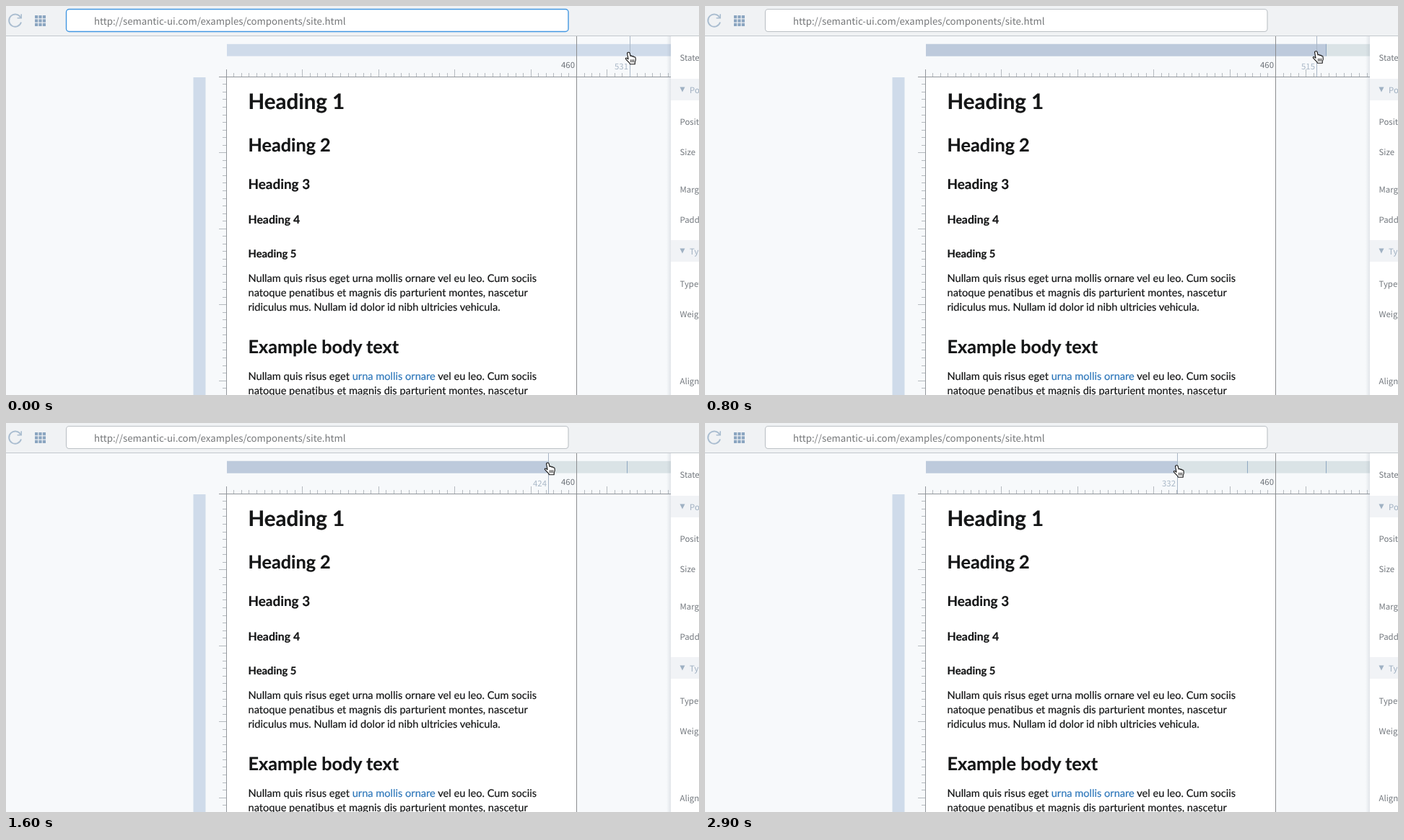
These frames come from a looping animation (960 by 540 pixels, 3100 ms). An HTML page:

```html
<!DOCTYPE html>
<html lang="en">
<head>
<meta charset="utf-8">
<title>Ruler breakpoints</title>
<style>
html, body { margin: 0; width: 100%; height: 100%; overflow: hidden; background: #f7f9fb; }
svg { display: block; width: 960px; height: 540px; }
text { white-space: pre; text-rendering: geometricPrecision; font-variant-ligatures: none; }
.ui { font-family: "Noto Sans CJK JP", "Noto Sans CJK SC", "Noto Sans", sans-serif; }
.page { font-family: Lato, sans-serif; fill: #141516; stroke: #141516; stroke-width: .2; }
.page tspan { fill: #2f78bb; stroke: #2f78bb; }
.bold { font-weight: 700; }
</style>
</head>
<body>
<svg id="stage" viewBox="0 0 960 540" xmlns="http://www.w3.org/2000/svg">
  <defs>
    <linearGradient id="shade">
      <stop offset="0" stop-color="#8a95a3" stop-opacity="0"/>
      <stop offset="1" stop-color="#8a95a3" stop-opacity=".2"/>
    </linearGradient>
  </defs>
  <rect width="960" height="540" fill="#f7f9fb"/>
  <g id="back"></g>
  <g id="bar">
    <rect id="track" x="306" y="52.8" width="615" height="16.8"/>
    <rect id="hot" x="306" y="52.8" height="16.8" fill="#bdcadc"/>
    <g id="marks" stroke="#8ea7c2"></g>
  </g>
  <g id="rulers"></g>
  <line id="guide" y1="42" y2="98" stroke="#a9b6c6"/>
  <text id="value" class="ui" y="88" font-size="11.4" text-anchor="end" fill="#abb9c8"></text>
  <g id="front"></g>
  <circle id="ring" fill="none" stroke="#d9262f" stroke-width="1.5"/>
  <g id="hand" stroke="#161616" stroke-width="1.15" stroke-linejoin="round" stroke-linecap="round">
    <path fill="#fff" d="M5 .8C6.2 .5 7 1.2 7.2 2.2L8 6C9 5.2 10.2 5.6 10.5 6.6C11.5 6 12.6 6.4 12.9 7.4C14 7 15 7.6 15.1 8.8C15.6 11 15.2 13 14.3 14.5L14.2 17.2H7.3L6.8 15.6C5 13.8 3.6 12.4 2.2 10.9C.4 9.4 1.6 7.9 3.2 8.9L5 10.2L3.7 3C3.4 2 4 1.1 5 .8Z"/>
    <path fill="none" stroke-width=".9" d="M8.6 11.2v3.2M10.6 11.2v3.2M12.6 11.2v3.2"/>
  </g>
</svg>
<script>
const $ = id => document.getElementById(id);
const NS = "http://www.w3.org/2000/svg";

function add(parent, tag, attrs, text) {
  const el = document.createElementNS(NS, tag);
  for (const k in attrs) el.setAttribute(k, attrs[k]);
  if (text) el.textContent = text;
  $(parent).appendChild(el);
  return el;
}
const set = (el, attrs) => { for (const k in attrs) el.setAttribute(k, attrs[k]); };
const rect = (g, x, y, width, height, fill, more) => add(g, "rect", { x, y, width, height, fill, ...more });
const line = (g, d, stroke, more) => add(g, "path", { d, stroke, fill: "none", ...more });
const ui = (g, x, y, size, fill, text) => add(g, "text", { class: "ui", x, y, "font-size": size, fill }, text);
const page = (y, size, text, bold) =>
  add("back", "text", { class: bold ? "page bold" : "page", x: 335.5, y, "font-size": size }, text);

const SCALE = 1.0547, BODY = 14.61;
const toX = v => Math.floor(304.7 + v * SCALE) + .5;

// page
rect("back", 306, 99, 485, 441, "#fff");
[[143, 29.5, "Heading 1"], [202, 25.2, "Heading 2"], [254, 18.9, "Heading 3"],
 [302, 15.8, "Heading 4"], [349, 14.77, "Heading 5"], [482, 25.2, "Example body text"]]
  .forEach(([y, size, text]) => page(y, size, text, true));
[[383, "Nullam quis risus eget urna mollis ornare vel eu leo. Cum sociis"],
 [403, "natoque penatibus et magnis dis parturient montes, nascetur"],
 [423, "ridiculus mus. Nullam id dolor id nibh ultricies vehicula."],
 [539, "natoque penatibus et magnis dis parturient montes, nascetur"]]
  .forEach(([y, text]) => page(y, BODY, text));
page(519, BODY).innerHTML =
  "Nullam quis risus eget <tspan>urna mollis ornare</tspan> vel eu leo. Cum sociis";
rect("back", 259.5, 99, 17, 441, "#cfdbea");

// rulers
let ticks = "";
for (let i = 1; i < 59; i++) {
  const d = i * 10 * SCALE, len = i % 10 ? 5 : 10;
  const x = Math.floor(305.3 + d) + .5, y = Math.floor(98.3 + d) + .5;
  ticks += `M${x} 98v${-len}`;
  if (y < 540) ticks += `M305 ${y}h${-len}`;
}
line("rulers", ticks, "#b5babf");
line("rulers", "M295 98.5H921M305.5 88V540", "#92969b");
line("rulers", "M790.5 42V540", "#8b8d90");
ui("rulers", 769, 86, 11.4, "#6d7278", "460");

// side panel
rect("front", 915, 42, 6, 498, "url(#shade)");
rect("front", 921, 42, 39, 498, "#fff");
[[116, "Po"], [340, "Ty"]].forEach(([y, text]) => {
  rect("front", 921, y - 15, 39, 30, "#f1f3f6");
  add("front", "path", { d: `M933.5 ${y - 3.5}h7l-3.5 7z`, fill: "#9fb1c3" });
  ui("front", 947, y + 4.5, 11.4, "#9fafc0", text);
});
[[76, "State"], [165, "Position"], [207, "Size"], [259, "Margin"], [301, "Padding"],
 [390, "Typeface"], [432, "Weight"], [525, "Align"]]
  .forEach(([y, text]) => ui("front", 933.5, y, 11.4, "#73787e", text));

// toolbar
rect("front", 0, 0, 960, 42, "#f0f2f4");
line("front", "M0 41.5H960", "#c3c8cd");
const box = rect("front", 83.5, 4.5, 695.5, 31, "#fff", { rx: 4 });
ui("front", 122, 25.5, 13.24, "#757779", "http://semantic-ui.com/examples/components/site.html");
line("front", "M20.3 16A8.6 8.6 0 1 0 21 22.6", "#aabdd0", { "stroke-width": 1.9 });
line("front", "M21.2 11.2V16.8H15.6", "#aabdd0", { "stroke-width": 1.6 });
for (let i = 0; i < 9; i++)
  rect("front", 40 + i % 3 * 5.4, 13 + Math.floor(i / 3) * 5.4, 4.2, 4.2, "#8aa5c0");

// pointer path: time, ruler value, hand offset from the guide, hand top
const PATH = [
  [0, 531, -7, 64], [300, 527, -4.7, 64], [700, 527, -4.7, 64],
  [800, 515, -6, 62.5], [900, 468, -7, 59.5], [1000, 437, -8, 57.5],
  [1100, 427, -6.5, 56], [1200, 424, -6, 55], [1600, 424, -6, 55],
  [1700, 412, -6.5, 55.5], [1800, 366, -7, 57], [1900, 337, -6.5, 58],
  [2000, 333, -6, 58.5], [2100, 332, -6, 58.5], [3100, 332, -6, 58.5]
];
const CLICKS = [[300, 527], [1400, 424], [2700, 332]];
const LOOP = 3100, STEP = 100;

function pointer(t) {
  const i = PATH.findIndex(p => p[0] > t);
  const a = PATH[i - 1], b = PATH[i], k = (t - a[0]) / (b[0] - a[0]);
  return [1, 2, 3].map(n => a[n] + (b[n] - a[n]) * k);
}

const marks = CLICKS.map(c => add("marks", "path", { d: `M${toX(c[1])} 52.8v16.8` }));

function draw(ms) {
  const t = Math.floor(ms % LOOP / STEP) * STEP;
  const [raw, dx, top] = pointer(t), v = Math.round(raw), x = toX(v);

  const splits = CLICKS.filter(c => t >= c[0] + 200);
  marks.forEach((m, i) => set(m, { visibility: i < splits.length ? "visible" : "hidden" }));
  const edge = splits.length ? toX(splits[splits.length - 1][1]) : 306;
  set($("track"), { fill: t < 500 ? "#cfdbea" : t < 600 ? "#d5dfe8" : "#dae3e6" });
  set($("hot"), { width: t >= 800 ? edge - 306 : 0 });
  set(box, t < 500 ? { stroke: "#4398e2", "stroke-width": 1.4 } : { stroke: "#bcc1c6", "stroke-width": 1.1 });

  set($("guide"), { x1: x, x2: x });
  set($("value"), { x: x - 2.5 });
  $("value").textContent = v;
  set($("hand"), { transform: `translate(${x + dx - .5} ${top - .5})` });

  const click = CLICKS.find(c => t >= c[0] && t < c[0] + 200);
  const r = !click ? 0 : t < click[0] + 100 ? 19 : 32.3;
  set($("ring"), { cx: x, cy: top - .8, r, visibility: click ? "visible" : "hidden" });
}

const start = performance.now();
function tick() {
  draw(performance.now() - start);
  requestAnimationFrame(tick);
}
draw(0);
requestAnimationFrame(tick);
</script>
</body>
</html>
```
